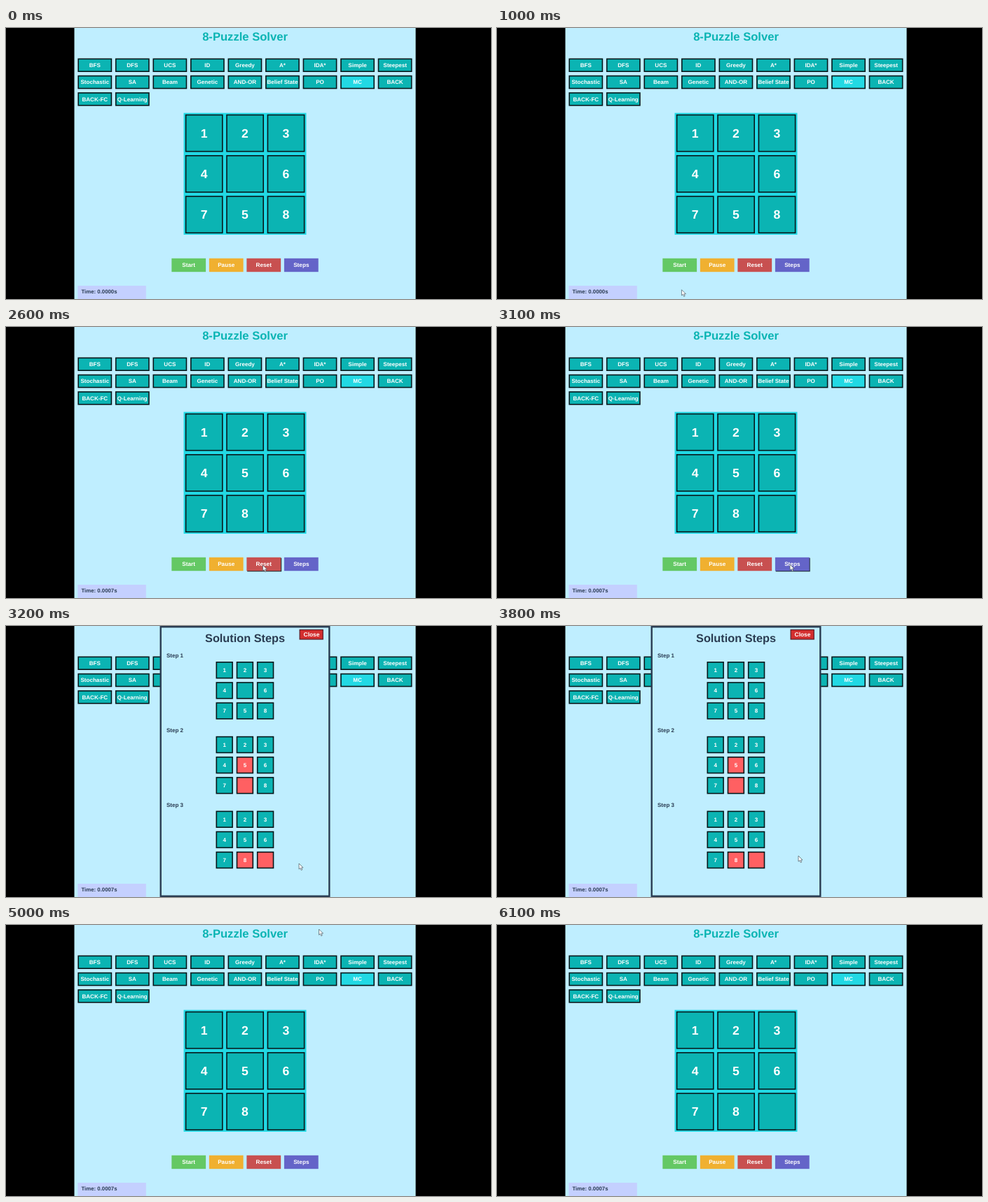
Animation of 692x388 px, one loop 6.6 s. Source, as an HTML page:

```html
<!DOCTYPE html>
<html lang="en">
<head>
<meta charset="utf-8">
<title>8-Puzzle Solver</title>
<style>
  html, body { margin: 0; width: 100%; height: 100%; overflow: hidden; background: #000; }
  svg { display: block; width: 100%; height: 100%; }
  text { font-family: "Liberation Sans", Arial, sans-serif; font-weight: 700; text-rendering: geometricPrecision; }
</style>
</head>
<body>
<svg id="stage" viewBox="0 0 692 388"></svg>
<script>
const LOOP = 6600, STEP = 100;
const TEAL = '#0bb4b3', CYAN = '#22d9e4', SKY = '#bfeeff', NAVY = '#2a3c52', INK = '#07181b', CORAL = '#ff6062';
const stage = document.getElementById('stage');

function add(parent, tag, attrs, content) {
  const el = document.createElementNS('http://www.w3.org/2000/svg', tag);
  for (const key in attrs) el.setAttribute(key, attrs[key]);
  if (content !== undefined) el.textContent = content;
  parent.appendChild(el);
  return el;
}

const rect = (parent, x, y, width, height, fill) => add(parent, 'rect', { x, y, width, height, fill });

// Filled box with its border drawn inside the edge
function box(parent, x, y, w, h, fill, stroke = INK, line = 1.6) {
  const el = rect(parent, x + line / 2, y + line / 2, w - line, h - line, fill);
  el.setAttribute('stroke', stroke);
  el.setAttribute('stroke-width', line);
  return el;
}

const label = (parent, x, y, size, str, fill = '#fff', anchor = 'middle') =>
  add(parent, 'text', { x, y, 'font-size': size, fill, 'text-anchor': anchor }, str);

const show = (el, on) => el.setAttribute('visibility', on ? 'visible' : 'hidden');

rect(stage, 0, 0, 692, 388, '#000');
rect(stage, 97.5, 0, 487, 388, SKY);
label(stage, 341, 18.2, 16.6, '8-Puzzle Solver', TEAL);

// Algorithm buttons
const algorithms = ['BFS', 'DFS', 'UCS', 'ID', 'Greedy', 'A*', 'IDA*', 'Simple', 'Steepest',
  'Stochastic', 'SA', 'Beam', 'Genetic', 'AND-OR', 'Belief State', 'PO', 'MC', 'BACK',
  'BACK-FC', 'Q-Learning'];
algorithms.forEach((name, i) => {
  const x = 102.4 + (i % 9) * 53.53, y = 43.5 + Math.floor(i / 9) * 24.3;
  box(stage, x, y, 48.8, 19.5, name === 'MC' ? CYAN : TEAL);
  label(stage, x + 24.4, y + 12.6, 8.05, name);
});

// Main board
const boards = ['1234 6758', '1234567 8', '12345678 '];
rect(stage, 253.5, 121.6, 175, 174.4, CYAN);
const digits = [...boards[0]].map((d, i) => {
  const x = 255.8 + (i % 3) * 58.4, y = 123.7 + Math.floor(i / 3) * 58.3;
  box(stage, x, y, 53.8, 53.8, TEAL);
  return label(stage, x + 26.8, y + 32.8, 17.6, d);
});

// Control buttons
const controls = [['Start', '#64c864'], ['Pause', '#f0b030'], ['Reset', '#c85050'], ['Steps', '#6464c8']]
  .map(([name, fill], i) => {
    const x = 236.3 + i * 53.53, y = 329.8;
    const shadow = rect(stage, x + .8, y + .8, 49, 19.6, '#1c2a30');
    rect(stage, x, y, 48.8, 19.4, fill);
    label(stage, x + 24.4, y + 12.2, 8.2, name);
    return { x, y, shadow };
  });

rect(stage, 102.4, 369, 97.4, 19, '#c4d0ff');
const timer = label(stage, 107.5, 380.2, 7.8, '', NAVY, 'start');

// Solution dialog
const dialog = add(stage, 'g', {});
box(dialog, 219.5, 0, 243, 388, SKY, NAVY, 2.4);
label(dialog, 341, 22.8, 16.3, 'Solution Steps', NAVY);
box(dialog, 418.5, 4.8, 34.3, 14.8, '#d32f2f', '#5a1c26', 1.2);
label(dialog, 436, 15, 8.4, 'Close');
boards.forEach((board, n) => {
  const top = 51 + n * 106.8;
  label(dialog, 229, top - 5.8, 8, 'Step ' + (n + 1), NAVY, 'start');
  [...board].forEach((d, i) => {
    const x = 299.5 + (i % 3) * 29.2, y = top + Math.floor(i / 3) * 29.15;
    const moved = n > 0 && d !== boards[n - 1][i];
    box(dialog, x, y, 24.4, 24.4, moved ? CORAL : TEAL);
    label(dialog, x + 12.2, y + 15, 8, d);
  });
});

const cursor = add(stage, 'path', {
  d: 'M0 0V8.2L1.9 6.5L3.2 9.6L4.7 9L3.4 6H6Z',
  fill: '#fff', stroke: '#46545e', 'stroke-width': .7, 'stroke-linejoin': 'round'
});

// Pointer path: time, x, y
const path = [
  [800, 268, 392], [1300, 255, 343], [2100, 255, 343], [2900, 418, 340], [3300, 418, 340],
  [3700, 430, 329], [4200, 430, 329], [4500, 469, 150], [4800, 447, 5], [5000, 446.5, 6], [5200, 446, -14]
];

function pointer(t) {
  const i = path.findIndex(p => p[0] > t);
  if (i < 1) return null;
  const [t0, x0, y0] = path[i - 1], [t1, x1, y1] = path[i];
  const u = (t - t0) / (t1 - t0), s = u * u * (3 - 2 * u);
  return [x0 + (x1 - x0) * s, y0 + (y1 - y0) * s];
}

function draw(t) {
  const board = boards[t < 2100 ? 0 : t < 2500 ? 1 : 2];
  digits.forEach((el, i) => { el.textContent = board[i]; });
  timer.textContent = 'Time: ' + (t < 1700 ? '0.0000s' : '0.0007s');
  show(dialog, t >= 3200 && t < 5000);

  const p = pointer(t);
  show(cursor, p);
  if (p) cursor.setAttribute('transform', `translate(${p[0]} ${p[1]})`);
  controls.forEach(({ x, y, shadow }) => {
    const over = p && p[0] >= x && p[0] <= x + 48.8 && p[1] >= y && p[1] <= y + 19.4;
    show(shadow, over && !(t >= 3200 && t < 5000));
  });
}

const start = performance.now();
function tick() {
  const t = (performance.now() - start) % LOOP;
  draw(Math.floor(t / STEP) * STEP);
  requestAnimationFrame(tick);
}
tick();
</script>
</body>
</html>
```
